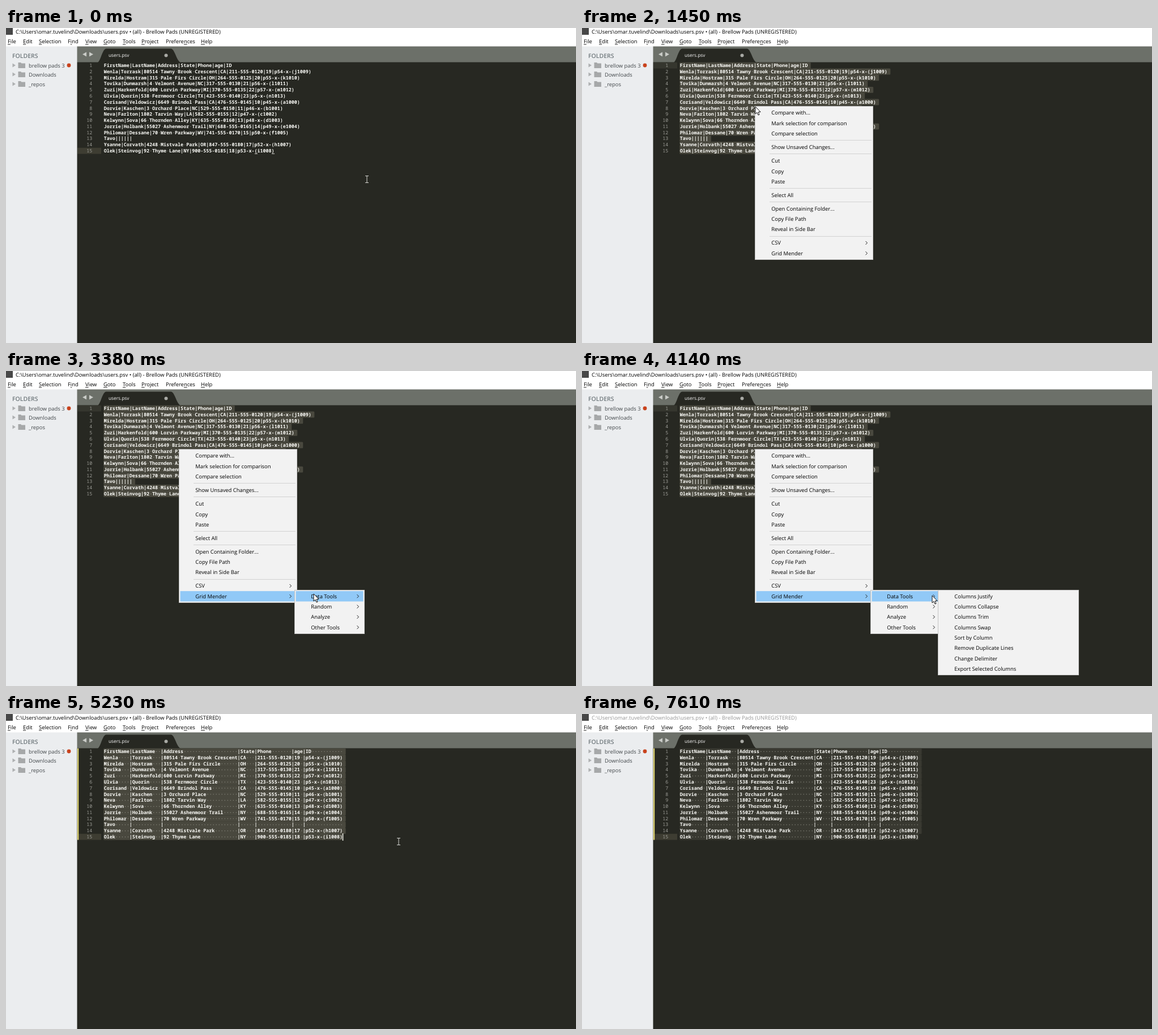
Animation, 1006 px wide and 557 px high, one loop 7700 ms. Source, as an HTML page with a canvas:

```html
<!DOCTYPE html>
<html lang="en">
<head>
<meta charset="utf-8">
<title>Column justify</title>
<style>
html, body { margin: 0; width: 100%; height: 100%; overflow: hidden; background: #272822; }
canvas { display: block; }
</style>
</head>
<body>
<canvas id="stage" width="1006" height="557"></canvas>
<script>
const ctx = document.getElementById('stage').getContext('2d');
const LOOP = 7700, PITCH = 5.022, LINE = 10.786, TEXT_X = 172.7, TOP = 60.8;
const UI = '9.4px "Open Sans", sans-serif';
const MONO = '600 8.37px "Noto Sans Mono", monospace';
const NUMBERS = '500 8.37px "Noto Sans Mono", monospace';
const CLICK = 4680, DRAG_START = 290, DRAG_END = 640;

const people = [
  'Wenla|Torrask|80514 Tawny Brook Crescent|CA',
  'Mirelda|Hostram|315 Pale Firs Circle|OH',
  'Tovika|Dunmarsh|4 Velmont Avenue|NC',
  'Zuzi|Harkenfold|600 Lorvin Parkway|MI',
  'Ulvia|Quorin|538 Fernmoor Circle|TX',
  'Corisand|Veldowicz|6649 Brindol Pass|CA',
  'Dorvie|Kaschen|3 Orchard Place|NC',
  'Neva|Farlton|1802 Tarvin Way|LA',
  'Kelwynn|Sova|66 Thornden Alley|KY',
  'Jorrie|Holbank|55027 Ashenmoor Trail|NY',
  'Philomar|Dessane|70 Wren Parkway|WV',
  'Tavo|||',
  'Ysanne|Corvath|4248 Mistvale Park|OR',
  'Olek|Steinvog|92 Thyme Lane|NY'
];
const rawLines = ['FirstName|LastName|Address|State|Phone|age|ID', ...people.map((person, i) => {
  if (person.endsWith('|')) return person + '|||';
  const k = (i + 9) % 14;
  const code = k === 13 ? 5 : 45 + k;
  return `${person}|${211 + i * 53}-555-01${20 + i * 5}|${10 + k}|p${code}-x-(${'abcdefghijklmn'[k]}${1000 + k})`;
})];
const cells = rawLines.map(line => line.split('|'));
const widths = cells[0].map((_, c) => Math.max(...cells.map(row => row[c].length)));
const justified = cells.map(row => row.map((cell, c) => cell.padEnd(widths[c])).join('|'));
const LAST = rawLines.length - 1;

const mousePath = [
  [80, 637, 267], [290, 477, 218], [600, 118, 8], [640, 118, 8], [840, 225, 90],
  [1150, 306, 139], [1680, 306, 139], [2370, 415, 386], [2450, 418, 392], [2640, 420, 398],
  [2850, 440, 399], [3230, 543, 394], [3770, 543, 394], [4530, 699, 400], [4780, 699, 400],
  [5380, 692, 193], [5460, 688, 184], [5840, 688, 184], [6120, 997, 514], [6160, 997, 514],
  [6300, 1001, 530], [6340, 1015, 570]
];
const caretFade = [[4680, 1], [5250, 1], [5380, 0], [5840, 0], [6000, 1], [6300, 1], [6460, 0],
  [6840, 0], [7000, 1], [7250, 1], [7380, 0]];

const menus = [
  { x: 305, y: 138, w: 209, h: 272, opens: 1200, items: [
    ['Compare with...', 150], ['Mark selection for comparison', 168.3], ['Compare selection', 186.6],
    ['Show Unsaved Changes...', 210.8], ['Cut', 235], ['Copy', 253.2], ['Paste', 271.4],
    ['Select All', 295.5], ['Open Containing Folder...', 319.7], ['Copy File Path', 338],
    ['Reveal in Side Bar', 356], ['CSV', 380, true], ['Grid Mender', 398.3, true]
  ], rules: [198, 222, 283, 307, 368] },
  { x: 509, y: 387, w: 124, h: 78, opens: 2850, items:
    ['Data Tools', 'Random', 'Analyze', 'Other Tools'].map((s, i) => [s, 398.3 + i * 18.3, true]), rules: [] },
  { x: 628, y: 387, w: 249, h: 151, opens: 3400, items:
    ['Columns Justify', 'Columns Collapse', 'Columns Trim', 'Columns Swap', 'Sort by Column',
     'Remove Duplicate Lines', 'Change Delimiter', 'Export Selected Columns']
      .map((s, i) => [s, 398.3 + i * 18.3]), rules: [] }
];

const clamp = (v, lo, hi) => Math.min(hi, Math.max(lo, v));

function sample(keys, t, ease = u => u) {
  const i = keys.findIndex(k => k[0] > t);
  if (i === 0) return keys[0].slice(1);
  if (i < 0) return keys[keys.length - 1].slice(1);
  const a = keys[i - 1], b = keys[i], u = ease((t - a[0]) / (b[0] - a[0]));
  return a.slice(1).map((v, n) => v + (b[n + 1] - v) * u);
}
const mouseAt = t => sample(mousePath, t, u => u * u * (3 - 2 * u)).map(Math.round);

function rect(x, y, w, h, color) {
  ctx.fillStyle = color;
  ctx.fillRect(x, y, w, h);
}
function text(s, x, y, color, font = UI, align = 'left') {
  ctx.font = font;
  ctx.textAlign = align;
  ctx.fillStyle = color;
  ctx.fillText(s, x, y);
}
function shape(points, fill, stroke) {
  ctx.beginPath();
  points.forEach(p => ctx.lineTo(...p));
  ctx.closePath();
  ctx.fillStyle = fill;
  ctx.fill();
  if (stroke) { ctx.strokeStyle = stroke; ctx.lineWidth = 1; ctx.stroke(); }
}
function disc(x, y, r, color) {
  ctx.fillStyle = color;
  ctx.beginPath();
  ctx.arc(x, y, r, 0, 7);
  ctx.fill();
}

function drawHeader(blur) {
  rect(0, 0, 1006, 32.5, '#fff');
  rect(0, 0, 12, 12, '#474747');
  const shade = Math.round(blur * 150);
  text('C:\\Users\\omar.tuvelind\\Downloads\\users.psv • (all) - Brellow Pads (UNREGISTERED)',
    17, 10, `rgb(${shade},${shade},${shade})`);
  const entries = [['File', 3, 0], ['Edit', 30, 0], ['Selection', 58, 0], ['Find', 109, 1], ['View', 140, 0],
    ['Goto', 172, 0], ['Tools', 206, 0], ['Project', 239, 0], ['Preferences', 282, 7], ['Help', 344, 0]];
  for (const [label, x, key] of entries) {
    text(label, x, 27.3, '#000');
    rect(x + ctx.measureText(label.slice(0, key)).width, 28.5, ctx.measureText(label[key]).width, 1, '#222');
  }
}

function drawSidebar() {
  rect(0, 32, 125.5, 525, '#ebedef');
  text('FOLDERS', 11, 52.7, '#70797d', '600 10.5px "Open Sans", sans-serif');
  [['brellow pads 3', 66], ['Downloads', 82], ['_repos', 99]].forEach(([label, y]) => {
    shape([[11.5, y - 3.5], [17, y], [11.5, y + 3.5]], '#aeb0b1');
    shape([[21.5, y - 5], [26, y - 5], [27.5, y - 3.5], [34, y - 3.5], [34, y + 5], [21.5, y + 5]], '#a6a8a9');
    text(label, 40, y + 3.5, '#42474a');
  });
  disc(111, 66, 3.4, '#c9431d');
}

function drawTabs() {
  rect(125, 32, 881, 28.5, '#6c7069');
  ctx.fillStyle = '#272822';
  ctx.beginPath();
  ctx.moveTo(162, 61);
  ctx.bezierCurveTo(168, 56, 170, 37, 177, 36.5);
  ctx.lineTo(291, 36.5);
  ctx.bezierCurveTo(298, 37, 300, 56, 308, 61);
  ctx.fill();
  shape([[142, 42.5], [142, 50.5], [135, 46.5]], '#c9cbc7');
  shape([[147, 42.5], [147, 50.5], [154, 46.5]], '#c9cbc7');
  text('users.psv', 181, 51.3, '#fff', '8.3px "Open Sans", sans-serif');
  disc(282.5, 48.5, 3, '#a9aaa5');
}

function drawEditor(t, blur) {
  const done = t >= CLICK, dragging = t >= DRAG_START && t < DRAG_END;
  const lines = done ? justified : rawLines;
  let row = LAST, col = lines[LAST].length;
  if (t >= DRAG_START && !done) {
    const [mx, my] = mouseAt(Math.min(t, DRAG_END));
    row = clamp(Math.floor((my - TOP) / LINE), 0, LAST);
    col = clamp(Math.round((mx - TEXT_X) / PITCH), 0, lines[row].length);
  }
  rect(126, TOP + row * LINE, 42, LINE, t < DRAG_START || done ? '#3e3d32' : '#35362e');
  if (done) rect(126, TOP, 2.2, LINE * lines.length, '#e0d570');

  if (t >= DRAG_START) {
    const mix = (a, b) => Math.round(a + (b - a) * blur);
    ctx.fillStyle = `rgb(${mix(73, 57)},${mix(72, 57)},${mix(62, 49)})`;
    const from = done ? 0 : row;
    for (let r = from; r <= LAST; r++) {
      const start = r === from && !done ? col : 0;
      const end = lines[r].length + (r < LAST ? 1 : 0);
      ctx.beginPath();
      ctx.roundRect(TEXT_X + start * PITCH - 0.5, TOP + r * LINE, (end - start) * PITCH + 0.5, LINE + 0.1, 1.5);
      ctx.fill();
    }
  }

  lines.forEach((line, r) => {
    const y = TOP + r * LINE;
    text(r + 1, 152.3, y + 8.2, '#9c9c96', NUMBERS, 'right');
    text(line, TEXT_X, y + 8.2, '#fcfcf8', MONO);
    for (let c = 0; c < line.length; c++)
      if (line[c] === ' ') rect(TEXT_X + c * PITCH + 2, y + 5, 1.2, 1.2, '#8c8c82');
  });

  if (t < DRAG_START) {
    const end = lines[LAST].length;
    for (const c of [end - 7, end - 1])
      rect(TEXT_X + c * PITCH, TOP + (LAST + 1) * LINE - 0.8, PITCH, 1, '#d8d8d2');
  }
  const caret = done ? sample(caretFade, t)[0] : dragging ? 1 : 0;
  ctx.globalAlpha = caret;
  rect(TEXT_X + col * PITCH - 0.7, TOP + row * LINE - 0.8, 1.4, 13, '#f8f8f0');
  ctx.globalAlpha = 1;
}

function drawItem(menu, [label, y, more], hot) {
  if (hot) rect(menu.x + 2.5, y - 9.1, menu.w - 5, 18.3, '#91c9f7');
  text(label, menu.x + 29.3, y + 3.4, '#000');
  if (!more) return;
  const x = menu.x + menu.w - 13.5;
  ctx.strokeStyle = '#222';
  ctx.lineWidth = 1;
  ctx.beginPath();
  ctx.moveTo(x, y - 3);
  ctx.lineTo(x + 3, y);
  ctx.lineTo(x, y + 3);
  ctx.stroke();
}

function drawMenus(t, mx, my) {
  if (t >= CLICK) {
    ctx.globalAlpha = clamp(1 - (t - CLICK) / 400, 0, 1);
    drawItem(menus[2], menus[2].items[0], true);
    ctx.globalAlpha = 1;
    return;
  }
  menus.forEach((menu, level) => {
    if (t < menu.opens) return;
    ctx.globalAlpha = clamp((t - menu.opens) / 140, 0, 1);
    rect(menu.x, menu.y, menu.w, menu.h, '#c4c4c4');
    rect(menu.x + 1, menu.y + 1, menu.w - 2, menu.h - 2, '#f2f2f2');
    for (const y of menu.rules) rect(menu.x + 26, y, menu.w - 29, 1, '#d2d2d2');
    menu.items.forEach((item, i) => {
      const held = level === 0 && t > 2530;
      const hot = held ? i === menu.items.length - 1 : mx > menu.x + 2.5 && Math.abs(my - item[1]) < 9.15;
      drawItem(menu, item, hot);
    });
    ctx.globalAlpha = 1;
  });
}

function drawMouse(t, x, y) {
  const arrow = (t > 1200 && t < 4900) || x < 126 || y < 61 || x > 990;
  if (arrow) {
    shape([[0, 0], [0, 13], [3, 10.3], [5, 15], [7, 14.2], [5.1, 9.7], [9, 9.4]]
      .map(([dx, dy]) => [x + dx, y + dy]), '#fff', '#111');
  } else {
    rect(x - 0.5, y - 5, 1, 11, '#d6d6d2');
    rect(x - 3, y - 6, 6, 1, '#d6d6d2');
    rect(x - 3, y + 6, 6, 1, '#d6d6d2');
  }
}

function draw(t) {
  const [mx, my] = mouseAt(t);
  const blur = clamp((t - 7490) / 110, 0, 1);
  ctx.textRendering = 'geometricPrecision';
  rect(0, 0, 1006, 557, '#272822');
  drawTabs();
  drawEditor(t, blur);
  drawSidebar();
  drawHeader(blur);
  drawMenus(t, mx, my);
  drawMouse(t, mx, my);
}

const began = performance.now();
function tick() {
  draw((performance.now() - began) % LOOP);
  requestAnimationFrame(tick);
}
tick();
</script>
</body>
</html>
```
